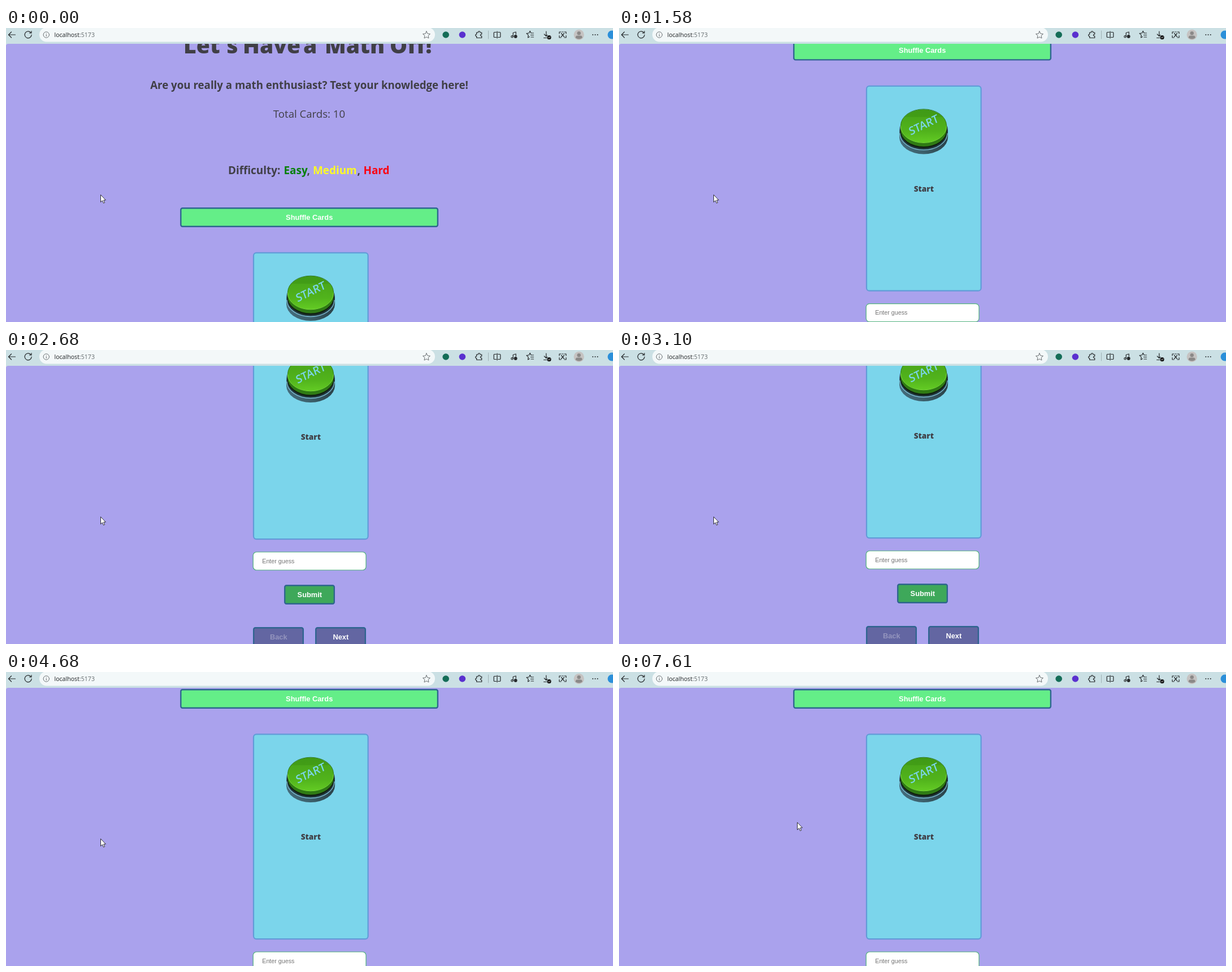
These frames come from a looping animation (1074 by 521 pixels, 7990 ms). An HTML page:

```html
<!DOCTYPE html>
<html lang="en">
<head>
<meta charset="utf-8">
<title>Math cards</title>
<style>
  html, body { margin: 0; width: 100%; height: 100%; overflow: hidden; background: #aaa2ed; }
  svg { display: block; width: 1074px; height: 521px; }
  .ui { font-family: "Open Sans", "Noto Sans", sans-serif; fill: #403f46; }
  .bold { font-weight: 700; }
  .btn { font: 700 12.8px "Liberation Sans", Arial, sans-serif; fill: #fff; text-anchor: middle; }
  .icon { fill: none; stroke: #25292b; stroke-width: 1.2; stroke-linecap: round; stroke-linejoin: round; }
</style>
</head>
<body>
<svg viewBox="0 0 1074 521" xmlns="http://www.w3.org/2000/svg">
  <defs>
    <clipPath id="view"><path d="M0 521V32q0-4 4-4H1074V521Z"/></clipPath>
    <linearGradient id="lid" x1="0" y1="0" x2="0" y2="1">
      <stop offset="0" stop-color="#3f9a17"/>
      <stop offset=".22" stop-color="#429d16"/>
      <stop offset=".24" stop-color="#4aa81a"/>
      <stop offset=".66" stop-color="#51b31c"/>
      <stop offset="1" stop-color="#63cb24"/>
    </linearGradient>
    <linearGradient id="base" x1="0" y1="0" x2="1" y2="0">
      <stop offset="0" stop-color="#456d7d"/>
      <stop offset=".5" stop-color="#3c606c"/>
      <stop offset="1" stop-color="#294148"/>
    </linearGradient>
  </defs>

  <rect width="1074" height="521" fill="#cbe0e4"/>

  <g clip-path="url(#view)">
    <rect y="28" width="1074" height="493" fill="#aaa2ed"/>
    <g id="page">
      <g class="ui" font-size="39" font-weight="800" id="title"></g>
      <text class="ui bold" font-size="18.7" x="536.5" y="108" text-anchor="middle">Are you really a math enthusiast? Test your knowledge here!</text>
      <text class="ui" font-size="18.6" x="536.5" y="159" text-anchor="middle">Total Cards: 10</text>
      <g class="ui bold" font-size="18.9" id="levels"></g>

      <rect x="309.3" y="319.2" width="454.6" height="32.6" rx="3" fill="#64ee88" stroke="#2f6590" stroke-width="2.4"/>
      <text class="btn" x="536.7" y="339.7">Shuffle Cards</text>

      <rect x="438" y="398.3" width="202.6" height="362.8" rx="5" fill="#7bd5eb" stroke="#629bd8" stroke-width="2.2"/>
      <g id="knob">
        <path d="M496 477a43 30 0 0 1 86 0v12a43 30 0 0 1-86 0Z" fill="url(#base)"/>
        <ellipse cx="539" cy="480" rx="42.2" ry="30.4" fill="#20343a"/>
        <path d="M497 482a42 29.5 0 0 0 84 0" fill="none" stroke="#79b9d0" stroke-width="1.3"/>
        <ellipse cx="539" cy="477.5" rx="41.3" ry="30.5" fill="#10200f"/>
        <path d="M498.3 469v7a40.7 29.5 0 0 0 81.4 0v-7Z" fill="#2f7b14"/>
        <ellipse cx="539" cy="469" rx="40.8" ry="29.4" fill="url(#lid)"/>
        <path d="M498.6 470a40.4 28.8 0 0 0 80.8 0" fill="none" stroke="#7bdc3a" stroke-width="1"/>
        <path d="M498.6 468a40.4 28.8 0 0 1 80.8 0" fill="none" stroke="#2c7013" stroke-width=".9"/>
        <text class="ui" font-size="19.5" font-weight="600" text-anchor="middle" transform="translate(541.5 473.5) rotate(-26) skewX(-6)" style="fill:#7bd5eb">START</text>
      </g>
      <text class="ui" font-size="13.6" font-weight="800" x="539.3" y="585.2" text-anchor="middle">Start</text>

      <rect x="437.2" y="784" width="199.8" height="32" rx="6" fill="#fff" stroke="#4fb07c" stroke-width="1.2"/>
      <text x="453.3" y="803.8" font-family="Liberation Sans, Arial, sans-serif" font-size="10.7" fill="#757575">Enter guess</text>
      <g id="buttons"></g>
    </g>
  </g>

  <g id="bar">
    <rect x="59" y="-1" width="700" height="25.5" rx="12.7" fill="#f3f8f9"/>
    <g class="icon">
      <path d="M16.5 12H4.5M9.5 7 4.5 12l5 5"/>
      <path d="M44.2 8.6A6 6 0 1 0 45.2 12M45 5.5V9H41.5"/>
      <g stroke="#6a6f72" stroke-width="1">
        <circle cx="71.3" cy="12" r="5.2"/>
        <path d="M71.3 11.5V14.6M71.3 9.4V9.5"/>
        <path id="star" d=""/>
      </g>
      <path d="M832.5 8h3a1.7 1.7 0 1 1 3.2 0h3v3.1a1.7 1.7 0 1 0 0 3.2V17.5h-9v-3a1.7 1.7 0 1 1 0-3.3Z"/>
      <path d="M853.5 5V19" stroke="#9fb0b4" stroke-width="1"/>
      <path d="M867.5 7.5H864.2a1 1 0 0 0-1 1v7a1 1 0 0 0 1 1h3.3M870.5 7.5h3.3a1 1 0 0 1 1 1v7a1 1 0 0 1-1 1h-3.3M869 6V18"/>
      <path d="M897.2 15.4V8.5l5-1.5v4"/>
      <circle cx="895.5" cy="15.3" r="1.7"/>
      <circle cx="901.6" cy="15" r="2.4" fill="#25292b"/>
      <path d="M923.5 17 924.2 12.6 921 9.6l4.3-.6 1.8-3.6 1.9 3.6h4.4M928.5 12.5h5M929 16h4.5M923.5 17l2.8-1.5"/>
      <path d="M955.8 6v8M952.3 11l3.5 3.5 2-2M951.5 17.5h5"/>
      <circle cx="961" cy="16.7" r="3.6" fill="#111" stroke="none"/>
      <path d="m959.5 16.8 1.1 1.1 2-2.2" stroke="#fff" stroke-width=".9"/>
      <path d="M979 10V7h3M988 7h3v3M979 13.500v3.500h3M988 17h3v-3.500M984 7h2M982.500 9.500l5 6M987.500 9.500l-5 6"/>
    </g>
    <circle cx="778.2" cy="12" r="5.8" fill="#146d57"/>
    <circle cx="807.4" cy="12" r="5.8" fill="#5a30cf"/>
    <circle cx="1013.7" cy="12" r="9.2" fill="#c5c3c2"/>
    <circle cx="1013.700" cy="9.300" r="3.200" fill="#8b8988"/>
    <path d="M1007.700 17.500q0-4 3-4h6q3 0 3 4-6 4-12 0Z" fill="#8b8988"/>
    <g fill="#25292b"><circle cx="1038.300" cy="12" r="1"/><circle cx="1042.500" cy="12" r="1"/><circle cx="1046.700" cy="12" r="1"/></g>
    <circle cx="1072" cy="12" r="7.500" fill="#2b8fd9"/>
    <text class="ui" font-size="10.6" x="85.500" y="16" style="fill:#1d2123">localhost<tspan fill="#62696c">:5173</tspan></text>
  </g>

  <path id="cursor" d="M.5.600V13.600L3.500 10.800 5.500 15.400 7.600 14.500 5.700 10H9.500Z" fill="#fff" stroke="#1c1c22" stroke-width=".9" stroke-linejoin="round"/>
</svg>
<script>
const LOOP = 7990;
const $ = id => document.getElementById(id);

// [time, scroll offset]
const scrolls = [
  [0, 0], [120, 67], [500, 84], [620, 150], [750, 190.2], [920, 215], [1050, 236],
  [1580, 295.4], [1730, 345], [1880, 367], [2140, 376], [2540, 412], [2680, 426],
  [2810, 437], [2960, 446], [3100, 428], [3250, 410], [4130, 375.6],
  [4280, 350], [4400, 322], [4530, 298], [4680, 288]
];
// [time, x, y]
const moves = [
  [0, 167, 295], [5360, 196, 284], [5480, 228, 273], [5630, 264, 271], [5760, 292, 271],
  [5900, 299, 271], [6030, 303, 271], [7470, 314, 266], [7610, 315, 266]
];

const words = (list, y) => list.map(([x, word, color]) =>
  `<text x="${x}" y="${y}"${color ? ` style="fill:${color}"` : ""}>${word}</text>`).join("");

const button = (x, y, label, fill, edge, ink) =>
  `<rect x="${x + 1.2}" y="${y + 1.2}" width="87.600" height="32.600" rx="3" fill="${fill}" stroke="${edge}" stroke-width="2.400"/>
   <text class="btn" x="${x + 45.3}" y="${y + 21.5}" style="fill:${ink}">${label}</text>`;

$("title").innerHTML = words([[314, "Let's"], [419, "Have"], [526, "a"], [564, "Math"], [679, "Off!"]], 45);
$("levels").innerHTML = words([
  [393, "Difficulty:"], [491.5, "Easy", "#078007"], [532.5, ","],
  [543, "Medium", "#fdfb26"], [621.5, ","], [632.5, "Hard", "#fb0412"]
], 259);
$("buttons").innerHTML =
  button(492, 842, "Submit", "#3ea85a", "#2f6590", "#fff") +
  button(437, 917, "Back", "#6366a2", "#2f6590", "#9495be") +
  button(547, 917, "Next", "#6366a2", "#2f6590", "#fff");

const starPath = (cx, cy, r) => "M" + Array.from({ length: 10 }, (_, i) => {
  const a = i * Math.PI / 5, d = i % 2 ? r * 0.48 : r;
  return `${(cx + d * Math.sin(a)).toFixed(1)} ${(cy - d * Math.cos(a)).toFixed(1)}`;
}).join("L") + "Z";
$("star").setAttribute("d", starPath(744, 12.6, 6.8));

const at = (keys, t) => keys.findLast(k => k[0] <= t);

function draw(t) {
  $("page").setAttribute("transform", `translate(0 ${-at(scrolls, t)[1]})`);
  const [, x, y] = at(moves, t);
  $("cursor").setAttribute("transform", `translate(${x} ${y})`);
}

function tick() {
  draw(performance.now() % LOOP);
  requestAnimationFrame(tick);
}
tick();
</script>
</body>
</html>
```
